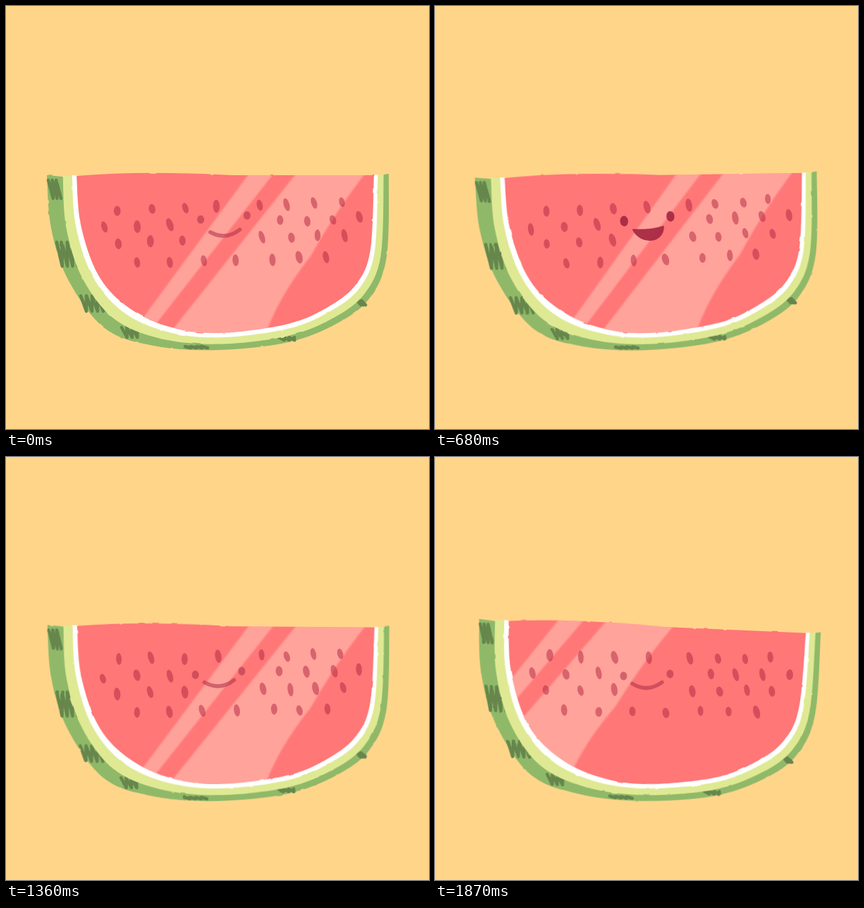
These frames come from a looping animation (600x600 px, 2.04 s). An HTML page:

```html
<!DOCTYPE html>
<html lang="en">
<head>
<meta charset="utf-8">
<title>Rocking watermelon</title>
<style>
  html, body { margin: 0; width: 100%; height: 100%; overflow: hidden; background: #ffd58a; }
  svg { display: block; width: 100vw; height: 100vh; }
</style>
</head>
<body>
<svg viewBox="0 0 600 600">
  <defs>
    <filter id="rough" filterUnits="userSpaceOnUse" x="0" y="150" width="600" height="400" color-interpolation-filters="sRGB">
      <feTurbulence id="grain" type="fractalNoise" baseFrequency=".07"/>
      <feDisplacementMap in="SourceGraphic" scale="2.5" xChannelSelector="R" yChannelSelector="G"/>
    </filter>
    <filter id="soft"><feGaussianBlur stdDeviation="1.2"/></filter>
    <linearGradient id="fade" gradientUnits="userSpaceOnUse" x1="398" y1="240" x2="452" y2="282">
      <stop offset="0" stop-color="#fff5de" stop-opacity=".05"/>
      <stop offset=".5" stop-color="#fff5de" stop-opacity=".32"/>
      <stop offset="1" stop-color="#fff5de" stop-opacity=".22"/>
    </linearGradient>
    <clipPath id="inside"><path id="clip"/></clipPath>
  </defs>
  <g id="slice">
    <g filter="url(#rough)">
      <path id="rind" fill="#8fb968"/>
      <path id="stripes" fill="none" stroke="#66864c" stroke-width="4.5" stroke-linejoin="round" stroke-linecap="round"/>
      <path id="pale" fill="#dfe993"/>
      <path id="white" fill="#fff"/>
      <path id="flesh" fill="#ff7777"/>
    </g>
    <g clip-path="url(#inside)">
      <g id="shine" filter="url(#soft)">
        <path d="M349 232 L384 232 L204 462 L180 462 Z" fill="#fff5de" fill-opacity=".34"/>
        <path id="wide" d="M416 232 L514 232 Q472 284 432 355 Q384 416 366 472 L226 472 Z"/>
      </g>
    </g>
    <g id="seeds" fill="#b2243f" fill-opacity=".5"></g>
  </g>
  <g id="face" stroke-linecap="round" stroke-linejoin="round"></g>
</svg>
<script>
const $ = id => document.getElementById(id);
const STEP = 170, STEPS = 12;
const mix = (a, b, u) => a + (b - a) * u;

function random(seed) {
  return () => {
    seed = (seed * 16807) % 2147483647;
    return seed / 2147483647;
  };
}

// Smooth curve through points
function curve(points) {
  const at = i => points[Math.max(0, Math.min(points.length - 1, i))];
  let d = `M${points[0]}`;
  for (let i = 0; i < points.length - 1; i++) {
    const [a, b, c, e] = [at(i - 1), at(i), at(i + 1), at(i + 2)];
    const p = [0, 1].map(k => b[k] + (c[k] - a[k]) / 6);
    const q = [0, 1].map(k => c[k] - (e[k] - b[k]) / 6);
    d += `C${p} ${q} ${c}`;
  }
  return d;
}

// The skin and the flesh, left to right; the layers between are blends of the two
const SKIN = [[58, 240], [64, 315], [88, 388], [140, 457], [210, 482], [300, 488],
  [400, 477], [470, 450], [516, 414], [540, 355], [543, 238]];
const FLESH = [[100, 240], [106, 310], [130, 380], [170, 425], [228, 454], [300, 464],
  [400, 451], [460, 425], [498, 393], [517, 345], [522, 240]];

function layer(left, right) {
  const points = SKIN.map(([x, y], i) => {
    const u = mix(left, right, Math.min(1, i / 5));
    return [mix(x, FLESH[i][0], u), mix(y, FLESH[i][1], u)];
  });
  const x1 = points[0][0], x2 = points[points.length - 1][0];
  return curve(points) + `L${x2 - 12} 240 L500 265 L110 265 L${x1 + 22} 242 Z`;
}

function zigzag(x, y, w, h) {
  const turns = Math.max(5, Math.round(w / 2));
  let d = '';
  for (let i = 0; i <= turns; i++) {
    const side = i % 2 ? 1 : -1;
    d += `${i ? 'L' : 'M'}${x + w * (2 * i / turns - 1) + side * 2} ${y + side * h}`;
  }
  return d;
}

const flesh = curve(FLESH) + 'L320 240 Q195 233 100 241 Z';
$('rind').setAttribute('d', layer(0, 0));
$('pale').setAttribute('d', layer(.54, .35));
$('white').setAttribute('d', layer(.85, .74));
$('flesh').setAttribute('d', flesh);
$('clip').setAttribute('d', flesh);
$('stripes').setAttribute('d', [
  [69, 260, 7, 13], [87, 352, 13, 17], [122, 422, 14, 11], [177, 463, 11, 7],
  [270, 484, 14, 1], [400, 472, 11, 2], [504, 421, 4, 3]
].map(box => zigzag(...box)).join(''));

function oval(x, y, rx, ry, turn) {
  return `<ellipse cx="${x}" cy="${y}" rx="${rx}" ry="${ry}" transform="rotate(${turn} ${x} ${y})"/>`;
}

// Rows of seeds: height, then start and count on each side of the face
const ROWS = [[284, 159, 4, 361, 4], [308, 138, 3, 388, 4], [331, 158, 3, 365, 4], [361, 186, 4, 379, 3]];

function drawSeeds(n) {
  const rnd = random(7919 * (n + 3));
  const spread = size => (rnd() - .5) * size;
  const run = (y, start, count, gap) => Array.from({ length: count }, (_, i) => {
    const x = start + gap * i;
    return oval(x + spread(4), y - (x - 300) * .035 + spread(4), 4.4 + spread(1), 8.2 + spread(3), spread(20) - 10);
  }).join('');
  return ROWS.map(([y, left, l, right, r]) => run(y, left, l, 47) + run(y, right, r, 38)).join('');
}

// Each key is eased into from the one before
const KEYS = [
  { at: 0, tilt: 0, x: 309, y: 300, drop: 19 },
  { at: 3, tilt: 4.7, x: 305, y: 300, drop: 16, power: 1.35 },
  { at: 7, tilt: -8, x: 296, y: 304, drop: 11, power: .6 },
  { at: 10, tilt: 5.8, x: 305, y: 308, drop: 12, power: .45 },
  { at: 12, tilt: 0, x: 297, y: 310, drop: 11, power: .8 }
];

function poseAt(n) {
  const i = KEYS.findIndex(key => key.at > n);
  const a = KEYS[i - 1], b = KEYS[i];
  const u = ((n - a.at) / (b.at - a.at)) ** b.power;
  const pick = name => mix(a[name], b[name], u);
  return { tilt: pick('tilt'), x: pick('x'), y: pick('y'), drop: pick('drop') };
}

function drawFace(n, { tilt, x, y, drop }) {
  const mood = Math.max(0, Math.sin(Math.PI * n / 8));
  const open = n > 1 && n < 8;
  const sag = 7 + 9 * mood, w = 21;
  const strength = .52 + .43 * Math.min(1, mood * 2.5);
  const size = [5 + mood * .7, 6 + mood * 1.5];
  const mouth = open
    ? `M${-w} ${drop}Q0 ${drop + 4} ${w} ${drop}C${w - 2} ${drop + sag * 1.3} ${10 - w} ${drop + sag * 1.4} ${-w} ${drop}Z`
    : `M${-w} ${drop}Q0 ${drop + sag * 2} ${w} ${drop}`;
  return `<g transform="translate(${x} ${y}) rotate(${tilt - 5})" opacity="${strength}" fill="#a92a45" stroke="none">`
    + oval(-33, 0, ...size, 0) + oval(33, 0, ...size, 0)
    + `<path d="${mouth}" ${open ? '' : 'fill="none"'} stroke="#a92a45" stroke-width="${open ? 3 : 5.5}"/></g>`;
}

let shown = -1;
function draw(n) {
  if (n === shown) return;
  shown = n;
  const pose = poseAt(n);
  const pass = (n + 1) % 4 - 1;
  $('slice').setAttribute('transform', `rotate(${pose.tilt} 300 340)`);
  $('grain').setAttribute('seed', n + 1);
  $('shine').setAttribute('transform', `translate(${165 * pass - 10 * pass * pass} 0)`);
  $('wide').setAttribute('fill', pass === 1 ? 'url(#fade)' : 'rgba(255,245,222,.35)');
  $('seeds').innerHTML = drawSeeds(n);
  $('face').innerHTML = drawFace(n, pose);
}

const start = performance.now();
function tick(now) {
  draw(Math.floor(Math.max(0, now - start) / STEP) % STEPS);
  requestAnimationFrame(tick);
}
draw(0);
requestAnimationFrame(tick);
</script>
</body>
</html>
```
